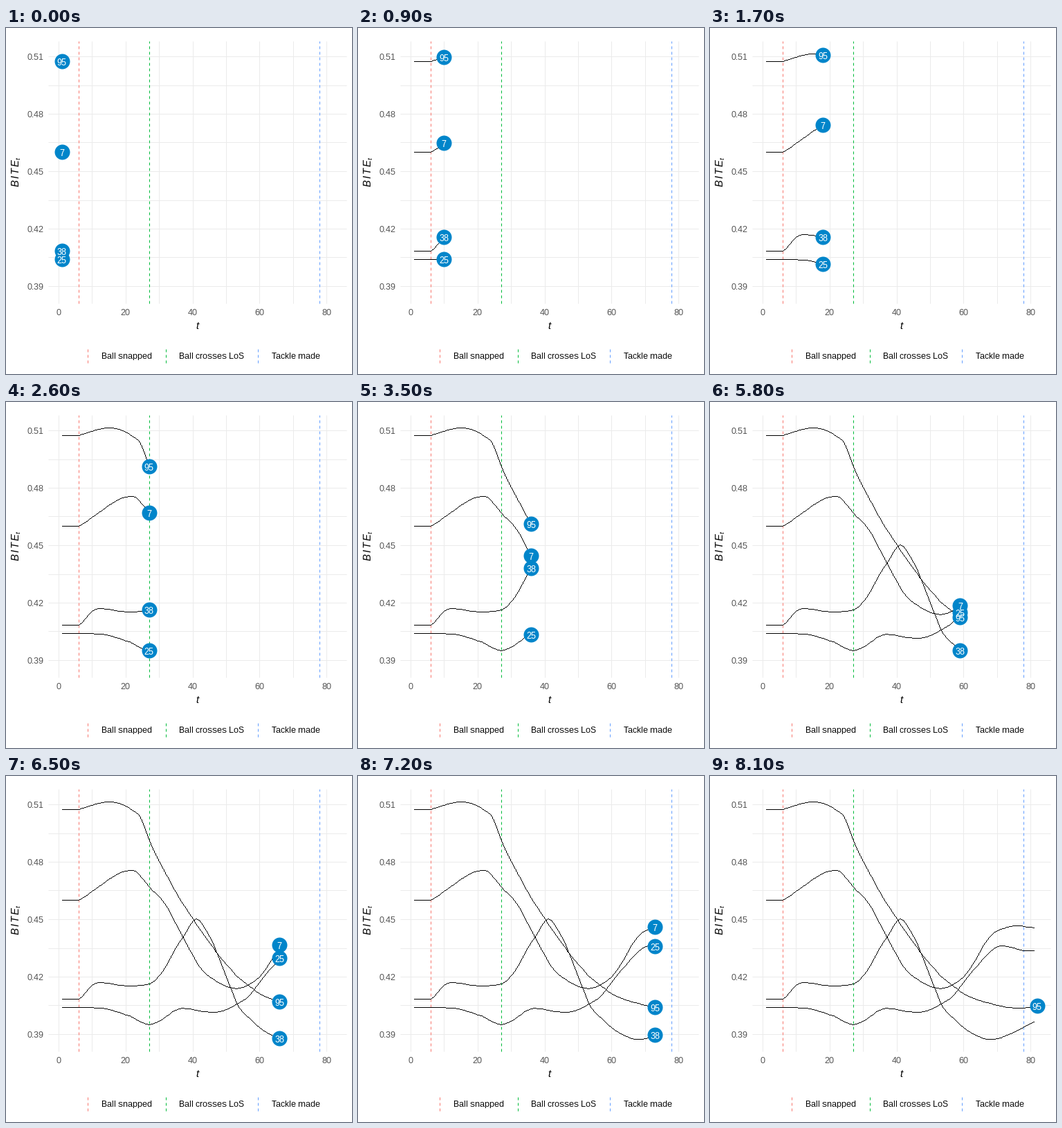
These frames come from a looping animation (500x500 px, 8200 ms). A matplotlib script:

```python
import matplotlib.pyplot as plt
import numpy as np
from matplotlib.animation import FuncAnimation

SIZE, DPI = 500, 100
PX = 72 / DPI  # points per pixel
LAST = 82
LEFT, RIGHT, TOP, BOTTOM = 61, 492, 19, 398
BADGE, GRID, TICK = "#0085CA", "#EBEBEB", "#4D4D4D"

# jersey number: last time step, key points (t, thousandths of BITE)
PLAYERS = {
    "95": (82, [(6, 507.6), (15, 511.6), (24, 504.4), (27, 491.2), (41, 447.8),
                (55, 417.8), (64, 408.1), (77, 403.7), (82, 404.8)]),
    "7": (81, [(6, 460), (22, 475.8), (27, 467), (30, 461.9), (45, 420),
               (53, 414), (59, 418.6), (70, 444.2), (76, 446.7), (82, 445.3)]),
    "38": (81, [(6, 408.4), (12, 417.1), (21, 415.3), (27, 416.4), (37, 440.6),
                (41, 450.4), (45, 441), (55, 401.6), (68, 387.5), (82, 397.2)]),
    "25": (81, [(6, 404.2), (12, 403.8), (21, 399.6), (27, 395.1), (37, 403.6),
                (46, 401.5), (55, 407.7), (64, 425.8), (71, 436.4), (78, 433.7)]),
}
# time step, legend position, colour, legend text
EVENTS = [(6, 118, "#F8766D", "Ball snapped"),
          (27, 231, "#00BA38", "Ball crosses LoS"),
          (78, 364, "#619CFF", "Tackle made")]

plt.rcParams.update({
    "font.family": "Liberation Sans",
    "text.hinting": "native",
    "text.hinting_factor": 1,
    "mathtext.fontset": "custom",
    "mathtext.it": "Liberation Sans:italic",
    "mathtext.rm": "Liberation Sans",
})


def x_px(t):
    return 75.9 + 4.84 * t


def y_px(value):
    return 41 + (0.51 - value) * 332 / 0.12


def smooth(keys, t):
    """Shape-preserving cubic through the key points, flat outside them."""
    knots, values = np.array(keys, float).T
    t = np.clip(t, knots[0], knots[-1])
    h = np.diff(knots)
    d = np.diff(values) / h
    slope = np.concatenate(([d[0]], np.zeros(len(d) - 1), [d[-1]]))
    for k in range(1, len(d)):
        if d[k - 1] * d[k] > 0:
            w1, w2 = 2 * h[k] + h[k - 1], h[k] + 2 * h[k - 1]
            slope[k] = (w1 + w2) / (w1 / d[k - 1] + w2 / d[k])
    k = np.clip(np.searchsorted(knots, t, side="right") - 1, 0, len(h) - 1)
    u = (t - knots[k]) / h[k]
    return ((1 + 2 * u) * (1 - u) ** 2 * values[k]
            + u * (1 - u) ** 2 * h[k] * slope[k]
            + u * u * (3 - 2 * u) * values[k + 1]
            + u * u * (u - 1) * h[k] * slope[k + 1])


def pixel_steps(xs, ys):
    """Rows and columns of a hard one-pixel line, one pair per time step."""
    cols, rows = np.rint(xs).astype(int), np.rint(ys).astype(int)
    steps = []
    for x0, x1, y0, y1 in zip(cols, cols[1:], rows, rows[1:]):
        n = max(abs(x1 - x0), abs(y1 - y0)) + 1
        steps.append((np.rint(np.linspace(y0, y1, n)).astype(int),
                      np.rint(np.linspace(x0, x1, n)).astype(int)))
    return steps


fig = plt.figure(figsize=(SIZE / DPI, SIZE / DPI), dpi=DPI, facecolor="white")
ax = fig.add_axes([0, 0, 1, 1])


def stroke(xs, ys, color, **style):
    ax.plot(xs, ys, color=color, lw=PX, solid_capstyle="butt", **style)


def vertical(x, y0, y1, color, **style):
    x = round(x)
    stroke([x, x], [y0, y1], color, **style)


def label(x, y, text, size, color="black", **style):
    style = {"ha": "center", "va": "baseline", "zorder": 6, **style}
    return ax.text(x, y, text, fontsize=size * PX, color=color, **style)


for t in range(0, 81, 10):
    vertical(x_px(t), BOTTOM, TOP, GRID, zorder=1)
    if t % 20 == 0:
        label(x_px(t), 415, str(t), 12, TICK)
for step in range(9):
    value = 0.39 + 0.015 * step
    y = round(y_px(value))
    stroke([LEFT, RIGHT], [y, y], GRID, zorder=1)
    if step % 2 == 0:
        label(55, y + 5, f"{value:.2f}", 12, TICK, ha="right")

dashed = dict(linestyle=(0, (4, 4)), dash_capstyle="butt", zorder=2)
for t, key_x, color, text in EVENTS:
    vertical(x_px(t), BOTTOM, TOP, color, **dashed)
    vertical(key_x, 484, 464, color, **dashed)
    label(key_x + 19.5, 478, text, 12, ha="left")

label(277.5, 435, "$t$", 15)
label(20, 208, r"$B\,I\,T\,E_t$", 15, rotation=90, rotation_mode="anchor")

ink = np.zeros((SIZE, SIZE, 4))
layer = ax.imshow(ink, extent=(0, SIZE, SIZE, 0), interpolation="nearest",
                  aspect="auto", zorder=3)
ax.set(xlim=(0, SIZE), ylim=(SIZE, 0))
ax.axis("off")

times = np.arange(1, LAST + 1)
xs = x_px(times)
players = []
for number, (end, keys) in PLAYERS.items():
    ys = y_px(smooth(keys, times) / 1000)
    badge, = ax.plot([], [], "o", ms=22 * PX, mew=0, color=BADGE, zorder=4)
    tag = label(0, 0, number, 13, "white")
    players.append((ys, end, pixel_steps(xs, ys), badge, tag))


def draw(frame):
    ink[...] = 0
    for ys, end, steps, badge, tag in players:
        for rows, cols in steps[:min(frame, end - 1)]:
            ink[rows, cols, 3] = 1
        active = frame < end
        badge.set_data([xs[frame]], [ys[frame]])
        tag.set_position((xs[frame], ys[frame] + 6))
        badge.set_visible(active)
        tag.set_visible(active)
    layer.set_data(ink)


animation = FuncAnimation(fig, draw, frames=LAST, interval=100,
                          repeat=True, repeat_delay=0)
plt.show()
```
